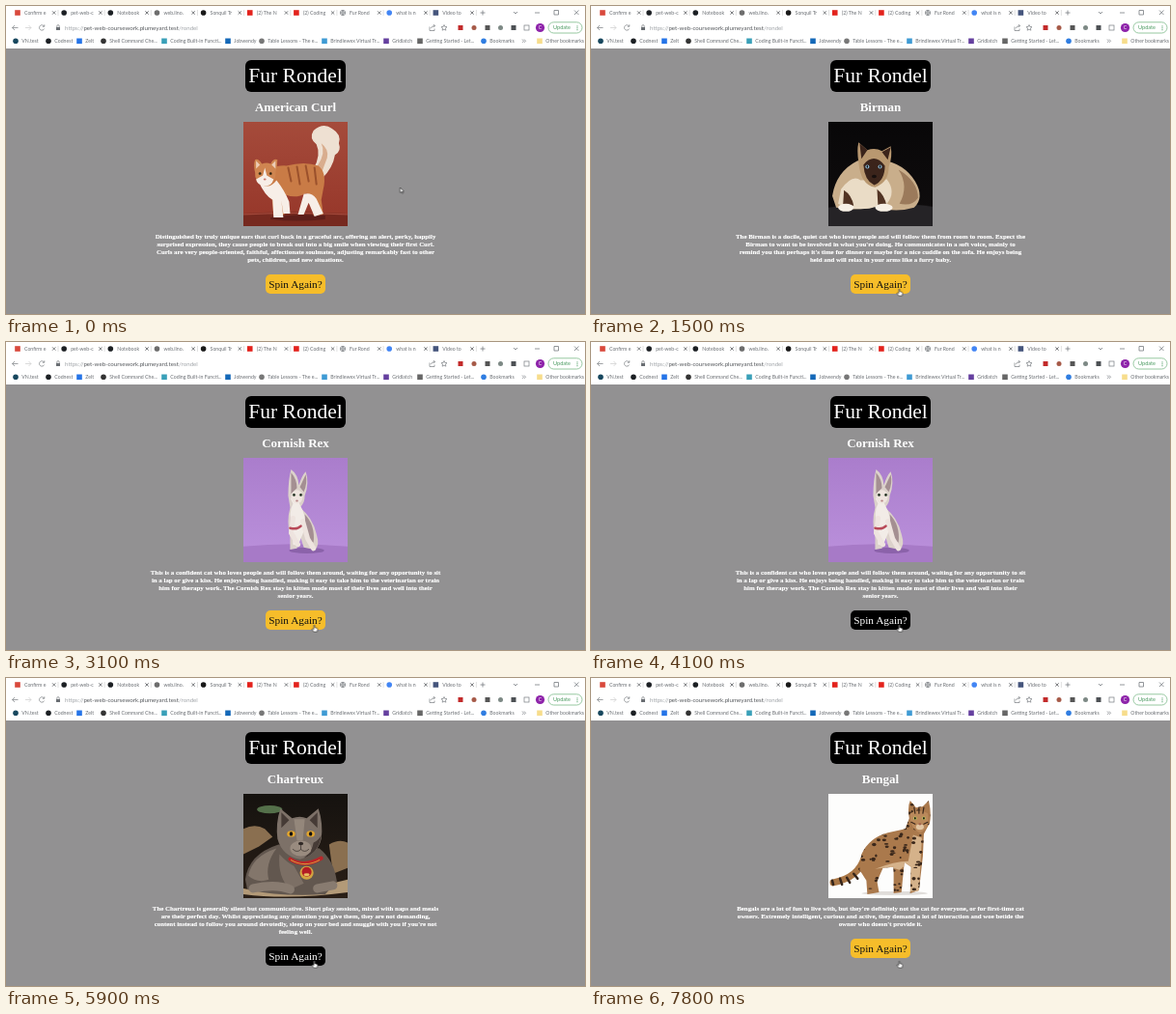
These frames come from a looping animation (600 by 319 pixels, 8000 ms). An HTML page:

```html
<!DOCTYPE html>
<html lang="en">
<head>
<meta charset="utf-8">
<title>Fur Rondel</title>
<style>
html, body { margin: 0; width: 100%; height: 100%; overflow: hidden; background: #929192; }
#bar, #cursor { position: absolute; left: 0; top: 0; }
#bar { background: #fff; font-family: Lato, "Open Sans", sans-serif; font-size: 5.2px; fill: #6a6e73; }
#bar .line { fill: none; stroke: #777b80; stroke-width: .7; }
#page { position: absolute; left: 0; top: 44px; width: 600px; height: 275px; overflow: hidden;
  font-family: "Liberation Serif", "Times New Roman", serif; text-align: center; color: #fff; }
#strip { animation: spin 8s step-end infinite; }
.scene { position: relative; width: 600px; height: 275px; }
.scene > * { position: absolute; margin: 0; }
.scene h2 { left: 0; width: 600px; top: 52.5px; font: bold 13px/15px "Liberation Serif", serif; }
.scene svg { left: 246px; top: 76px; }
.scene p { left: 0; width: 600px; top: 191px; font-weight: bold; font-size: 6.88px; line-height: 8px;
  white-space: pre; -webkit-text-stroke: .15px #fff; }
.btn { left: 269px; top: 234px; width: 62px; height: 20px; border-radius: 5px;
  font-size: 11.27px; line-height: 21px; animation: hover 8s step-end infinite; }
.short .btn { top: 226px; }
#logo { position: absolute; left: 248px; top: 12px; width: 104px; height: 32.5px; border-radius: 6px;
  background: #000; font-size: 21.5px; line-height: 32px; }
.busy { animation: busy 8s step-end infinite; }
.wheel { transform-box: fill-box; transform-origin: center; animation: turn 1s steps(10) infinite; }
#move { animation: move 8s step-end infinite; }
#arrow { animation: arrow 8s step-end infinite; }
#hand { animation: hand 8s step-end infinite; }

@keyframes spin {
  0% { transform: translateY(0); }
  17.5% { transform: translateY(-275px); }
  38.75% { transform: translateY(-550px); }
  56.25% { transform: translateY(-825px); }
  80%, 100% { transform: translateY(-1100px); }
}
@keyframes hover {
  0%, 17.5%, 38.75%, 56.25%, 80%, 100% { background: #f6bd2a; color: #111; }
  6.25%, 33.75%, 51.25%, 73.75% { background: #000; color: #fff; }
}
@keyframes busy {
  0%, 17.5%, 38.75%, 56.25%, 80%, 100% { opacity: 0; }
  12.5%, 35%, 52.5%, 75% { opacity: 1; }
}
@keyframes turn { to { transform: rotate(360deg); } }
@keyframes move {
  0% { transform: translate(408.5px, 188px); }
  1.25% { transform: translate(406px, 193px); }
  2.5% { transform: translate(396px, 212px); }
  3.75% { transform: translate(375px, 243px); }
  5% { transform: translate(350px, 273px); }
  6.25% { transform: translate(329px, 289px); }
  7.5% { transform: translate(321px, 295px); }
  8.75%, 100% { transform: translate(319.5px, 293px); }
}
@keyframes arrow { 0% { opacity: 1; } 6.25%, 100% { opacity: 0; } }
@keyframes hand { 0% { opacity: 0; } 6.25%, 100% { opacity: 1; } }
</style>
</head>
<body>
<svg id="bar" width="600" height="43.5" viewBox="0 0 600 43.5">
  <g id="tabs"></g>
  <g class="line">
    <path d="M494 4.500v5M491.500 7h5M526 6l2 2 2-2M548 7h5M568 4.500h4.500v4.500h-4.500zM589 4.500l4.500 4.500m0-4.500l-4.500 4.500" stroke-width=".8"/>
    <path d="M12.500 22.500h-6m2.500-2.500l-2.500 2.500 2.500 2.500"/>
    <path style="stroke:#ccc" d="M20 22.500h6m-2.500-2.500l2.500 2.500-2.500 2.500"/>
    <path d="M39.500 21a2.700 2.700 0 1 0 .2 2.500M39.800 19.300v2h-2"/>
    <path d="M52.800 22v-1.200a1.200 1.200 0 0 1 2.400 0V22"/>
    <path d="M439 21.500v4h5v-2M440.500 23q.5-2.500 4-2.500m-1.500-1.500l1.500 1.500-1.500 1.500"/>
    <path d="M454 19.500l.9 2 2.100.2-1.600 1.400.5 2.100-1.900-1.100-1.900 1.100.5-2.100-1.600-1.400 2.100-.2z"/>
    <rect x="537" y="20" width="5" height="5"/>
    <path d="M535 34.500l1.500 1.700-1.500 1.700m2-3.400l1.500 1.700-1.500 1.700"/>
  </g>
  <rect x="52" y="22" width="4" height="3" fill="#6a6e73"/>
  <text x="61" y="24.500" font-size="6.200" fill="#a0a4a8">https://<tspan fill="#55585c">pet-web-coursework.plumeyard.test</tspan>/rondel</text>
  <g id="tools"></g>
  <text x="553.500" y="24.300" font-size="5" text-anchor="middle" fill="#fff">C</text>
  <rect x="562" y="16.800" width="35" height="11.200" rx="5.600" fill="#fff" stroke="#7dba89" stroke-width=".8"/>
  <text x="567" y="24.300" style="fill:#4a9a60" font-size="5.600">Update</text>
  <path d="M592 20.500v.9m0 1v.9m0 1v.9" stroke="#2a8a45"/>
  <g id="marks"></g>
  <g class="line"><circle cx="349" cy="7" r="2.700"/><path d="M346.300 7h5.400M349 4.300q-2.400 2.700 0 5.400q2.400-2.700 0-5.400"/></g>
  <g class="busy">
    <path fill="#fff" d="M33 18h9v9h-9zM345 3h8v8h-8z"/>
    <path class="line" d="M35 20l5 5m0-5l-5 5"/>
    <path class="line wheel" style="stroke:#3b78e7" d="M349 4.300a2.700 2.700 0 1 1-2.700 2.700"/>
  </g>
</svg>

<div id="page">
  <div id="strip"></div>
  <div id="logo">Fur Rondel</div>
</div>

<svg id="cursor" width="600" height="319" viewBox="0 0 600 319">
  <g id="move" stroke="#111" stroke-width=".55" fill="#fff">
    <path id="arrow" d="M0 0v5.400l1.300-1.100.9 1.900.9-.4-.9-1.800h1.600z"/>
    <path id="hand" d="M-.6.500q.6-1 1.200 0v2.300l2.300.6q.7.300.5 1.200l-.6 2.600h-3.400l-1.900-2.800q.3-.9 1.900.2z"/>
  </g>
</svg>

<script>
const $ = id => document.getElementById(id);
const dot = (x, y, c, square, r = 2.8) => square
  ? `<rect x="${x - r}" y="${y - r}" width="${r * 2}" height="${r * 2}" fill="${c}"/>`
  : `<circle cx="${x}" cy="${y}" r="${r}" fill="${c}"/>`;
const label = (x, y, s) => `<text x="${x}" y="${y}">${s}</text>`;

const tabs = [
  ["Confirm e", "#d9483b", 1], ["pet-web-c", "#1b1f23"], ["Notebook", "#1b1f23"], ["web.ilno.", "#6d6d6d"],
  ["Sonquil Tr", "#191919"], ["(2) The N", "#e3221c", 1], ["(2) Coding", "#e3221c", 1], ["Fur Rond"],
  ["what is n", "#4285f4"], ["Video to", "#45557c", 1]
];
$("tabs").innerHTML = tabs.map(([s, c, sq], i) => {
  const x = 12 + i * 48.15;
  return (c ? dot(x, 7, c, sq) : "") + label(x + 7, 8.9, s) +
    `<path class="line" style="stroke:#44474b" d="M${x + 36} 5.3l3.4 3.4m0-3.4l-3.4 3.4"/>` +
    `<path stroke="#ccc" stroke-width=".6" d="M${x + 42} 4v6"/>`;
}).join("");

$("tools").innerHTML = [
  [471, "#c22a2a", 1], [485, "#a65a48"], [499, "#555", 1], [512.5, "#7d8985"], [526, "#4c5054", 1]
].map(([x, c, sq]) => dot(x, 22.5, c, sq, 2.5)).join("") + dot(553.5, 22.5, "#8e24aa", 0, 4.6);

$("marks").innerHTML = [
  [10, "VN.test", "#17475e"], [44, "Codnest", "#1b1f23"], [76, "Zelt", "#2574e8", 1],
  [101, "Shell Command Che...", "#333"], [164, "Coding Built-in Functi...", "#3aa0b8", 1],
  [230, "Jobwendy", "#1468b8", 1], [265, "Table Lessons - The e...", "#777"],
  [330, "Brindlewex Virtual Tr...", "#3f9bd4", 1], [394, "Gridlatch", "#65409f", 1],
  [429, "Getting Started - Let...", "#666", 1], [495, "Bookmarks", "#2f7de1"],
  [553, "Other bookmarks", "#f7dd8c", 1]
].map(([x, s, c, sq]) => dot(x, 36.3, c, sq) + label(x + 6.3, 38, s)).join("");

let seed = 7;
const rnd = () => (seed = seed * 16807 % 2147483647) / 2147483647;
const spots = (n, w, h, c) => Array.from({ length: n }, () =>
  `<ellipse cx="${(rnd() * w).toFixed(1)}" cy="${(rnd() * h).toFixed(1)}" rx="${(1 + rnd() * 1.3).toFixed(1)}" ry="${(.7 + rnd()).toFixed(1)}" fill="${c}"/>`).join("");
const shape = (c, d) => `<path fill="${c}" d="${d}"/>`;
const stroke = (c, w, d) => `<path fill="none" stroke="${c}" stroke-width="${w}" stroke-linecap="round" stroke-linejoin="round" d="${d}"/>`;
const oval = (c, x, y, rx, ry) => `<ellipse cx="${x}" cy="${y}" rx="${rx}" ry="${ry}" fill="${c}"/>`;
const eyes = (c, x1, x2, y, r, flat = 1) => [x1, x2].map(x =>
  oval(c, x, y, r, r * flat) + oval("#111", x, y, r * .4, r * .7 * flat)).join("");
const back = (id, top, end) => `<linearGradient id="${id}" x2="0" y2="1"><stop stop-color="${top}"/><stop offset="1" stop-color="${end}"/></linearGradient><rect width="107" height="107" fill="url(#${id})"/>`;

const curl = back("g1", "#a54b3b", "#963629") +
  shape("#76291f", "M0 94q50-3 107 0v13H0z") + stroke("#a3483a", 1.2, "M0 95q50-3 107 0") +
  shape("#5d1f1a", "M28 98q25-4 56-2v4q-30 3-56 0z") +
  shape("#eee0d2", "M72 48Q80 34 75 23 67 17 72 9 82 0 91 7 101 13 98 22 101 30 94 34 92 47 81 58z") +
  shape("#d9ad8e", "M76 45Q85 32 80 22 88 28 86 37L80 53z") +
  shape("#c97b46", "M18 58Q27 44 44 45 63 40 77 45 86 52 82 69L80 80 82 95 72 96 71 80 65 73Q54 79 44 75L42 95 31 96 29 76Q17 70 18 58z") +
  stroke("#9b512c", 2, "M46 47l3 14M55 46l3 18M64 45l3 16M73 47l2 17") +
  shape("#f7eee7", "M15 60Q25 72 34 60 42 70 47 82L48 94 41 94 39 81 41 98 31 98 30 80Q22 76 15 60zM62 74Q70 72 75 79L82 94 73 97 67 83 62 95 56 95z") +
  shape("#cf8550", "M12 52Q10 44 12 39 15 37 19 43 24 41 28 43 31 37 35 39 35 45 33 52 34 62 22 66 11 62 12 52z") +
  shape("#eccdb6", "M13 40l4 4-4 4zM33 40l-4 4 4 4z") +
  shape("#f7eee7", "M22 47l2 8 7 4q-2 7-9 7-8-1-9-7l7-4z") +
  eyes("#6b4a24", 17, 28, 53, 1.5) + oval("#c97b70", 22, 59, 1.4, 1);

const birman = back("g2", "#080708", "#100d0e") + shape("#252326", "M0 88q50-8 107-1v20H0z") +
  shape("#c9ae8b", "M4 76Q8 51 30 40L55 39Q78 43 89 61 99 78 88 88 68 94 48 87 28 92 8 88z") +
  shape("#eadcc6", "M13 69Q25 53 33 60L60 59Q70 72 60 84L42 89Q20 91 10 84z") +
  shape("#9b7a5b", "M72 49Q92 61 92 78 86 87 73 84 83 66 72 49z") +
  shape("#523424", "M16 70q8 5 10 16h-11zM50 69q8 6 10 18h-9z") +
  oval("#f7f0e5", 18, 88, 8, 4) + oval("#f7f0e5", 57, 88, 9, 4) +
  shape("#b99870", "M31 41Q29 29 31 21L40 29Q48 26 55 30L64 25Q66 36 62 46 62 62 48 67 33 65 31 41z") +
  shape("#3b241b", "M32 22l8 7-6 9zM64 26l-9 5 6 8zM36 44Q47 31 58 45 58 60 47 65 37 60 36 44z") +
  eyes("#91bedd", 40, 53, 46, 2) + oval("#17100e", 47, 56, 2.5, 1.8);

const cornish = back("g3", "#aa7dcc", "#bb91dc") + shape("#a77ac7", "M0 91q50-5 107 0v16H0z") +
  oval("#8b62aa", 65, 95, 18, 3) +
  shape("#dcd2cb", "M46 39Q46 23 49 12 56 17 57 28 60 18 64 14 68 25 63 39 63 47 58 51 71 61 75 78 79 91 73 94L62 92 58 79 55 93 48 94 48 82Q44 65 48 51z") +
  shape("#a48f92", "M49 15q6 7 6 16l-6 6zM64 17q2 9-2 18l-4-5zM63 58q11 11 9 29l-8-6z") +
  shape("#f2ece7", "M48 41l8 3 5 10q5 13 0 24l-5 12-5-1-1-18q-4-16 1-24z") +
  stroke("#eee4df", 5, "M51 62l-2 15 7 12M61 65l5 18 6 10") +
  stroke("#b84958", 2.5, "M48 72q7 2 11-2") +
  oval("#efe5df", 55, 40, 6, 7) + eyes("#61715c", 52, 59, 38, 1.6) + oval("#b78586", 55, 44, 1.3, 1);

const chartreux = back("g4", "#15120f", "#2a1f17") +
  oval("#54704a", 27, 16, 13, 4) +
  shape("#8a6f50", "M0 36q12-6 22 0l8 8-14 10-16 8zM88 52q10-6 19-2v26l-15 6z") +
  shape("#b39a78", "M0 97q40 8 107-9v13q-60 8-107 2z") +
  shape("#62574f", "M2 88Q5 62 36 52L78 56Q93 68 96 90L84 103Q40 106 4 98z") +
  shape("#83766b", "M5 84Q9 64 34 56 22 72 26 88 14 92 5 84z") +
  shape("#7c6f65", "M37 62Q44 70 52 74L62 92 48 98Q35 86 37 62z") +
  stroke("#887b70", 9, "M10 97Q34 92 48 98M76 97l16-3") +
  shape("#7d7168", "M35 46Q33 30 38 15L50 25Q58 22 65 25L77 15Q82 30 80 46 76 63 58 67 40 64 35 46z") +
  shape("#463b36", "M39 19l8 8-8 8zM76 19l-8 8 8 8zM72 50q6-3 8-8-2 18-18 24 9-8 10-16z") +
  shape("#94877b", "M52 26h11l-2 22h-6z") +
  oval("#998b7f", 59, 56, 11, 8) + eyes("#e2a52c", 49, 69, 41, 4.2, .75) +
  oval("#302926", 59, 51, 2.6, 1.8) + stroke("#403934", .8, "M59 53v4q-4 4-8 0m8 0q4 4 8 0") +
  stroke("#ba2628", 4, "M48 67q14 9 32-1") + stroke("#dca63c", 1, "M49 68q14 8 29 0") +
  oval("#d3a540", 65, 81, 7, 7) + oval("#b31c25", 65, 80, 5, 5) + oval("#e8bf60", 65, 83, 3, 1.4);

const bengalBody = "M34 62Q42 45 61 40L79 36 83 25Q81 13 84 7L90 14 97 13 103 7Q106 20 104 30L98 41 97 64 93 99 84 102 85 75 78 70 75 101 67 102 67 75 56 76 50 90 52 101 40 103 39 89 32 78z";
const bengal = `<rect width="107" height="107" fill="#fdfdfc"/>` + oval("#e0ddda", 68, 102, 34, 2) +
  stroke("#a97645", 7, "M37 65Q31 86 5 91") +
  stroke("#35251b", 2.5, "M32 77l5 4M26 82l4 5M19 86l3 5M12 87l2 6M4 89l1 4") +
  shape("#aa794c", bengalBody) +
  `<clipPath id="coat"><path d="${bengalBody}"/></clipPath><g clip-path="url(#coat)">` +
  shape("#d5b28a", "M48 77q20-8 34-8l5-27 9 3-3 55H80l-2-26-5 4-10-3z") + spots(200, 107, 107, "#3b281b") + `</g>` +
  shape("#ba895b", "M84 20q9-6 18 0 3 15-8 20-11-5-10-20z") +
  stroke("#39271b", 1.2, "M88 14l1 6M93 14v6M98 14l-1 6M85 29l4 2M102 29l-4 2") +
  eyes("#b5b45a", 89, 98, 25, 1.9) + oval("#e2c6a4", 94, 34, 4, 3) + oval("#a3614c", 94, 31, 1.6, 1.1);

const cats = [
  ["American Curl", curl, `Distinguished by truly unique ears that curl back in a graceful arc, offering an alert, perky, happily
surprised expression, they cause people to break out into a big smile when viewing their first Curl.
Curls are very people-oriented, faithful, affectionate soulmates, adjusting remarkably fast to other
pets, children, and new situations.`],
  ["Birman", birman, `The Birman is a docile, quiet cat who loves people and will follow them from room to room. Expect the
Birman to want to be involved in what you're doing. He communicates in a soft voice, mainly to
remind you that perhaps it's time for dinner or maybe for a nice cuddle on the sofa. He enjoys being
held and will relax in your arms like a furry baby.`],
  ["Cornish Rex", cornish, `This is a confident cat who loves people and will follow them around, waiting for any opportunity to sit
in a lap or give a kiss. He enjoys being handled, making it easy to take him to the veterinarian or train
him for therapy work. The Cornish Rex stay in kitten mode most of their lives and well into their
senior years.`],
  ["Chartreux", chartreux, `The Chartreux is generally silent but communicative. Short play sessions, mixed with naps and meals
are their perfect day. Whilst appreciating any attention you give them, they are not demanding,
content instead to follow you around devotedly, sleep on your bed and snuggle with you if you're not
feeling well.`],
  ["Bengal", bengal, `Bengals are a lot of fun to live with, but they're definitely not the cat for everyone, or for first-time cat
owners. Extremely intelligent, curious and active, they demand a lot of interaction and woe betide the
owner who doesn't provide it.`]
];
$("strip").innerHTML = cats.map(([name, art, text]) =>
  `<div class="scene${text.split("\n").length < 4 ? " short" : ""}"><h2>${name}</h2>` +
  `<svg width="108" height="108" viewBox="0 0 107 107">${art}</svg>` +
  `<p>${text}</p><div class="btn">Spin Again?</div></div>`).join("");
</script>
</body>
</html>
```
